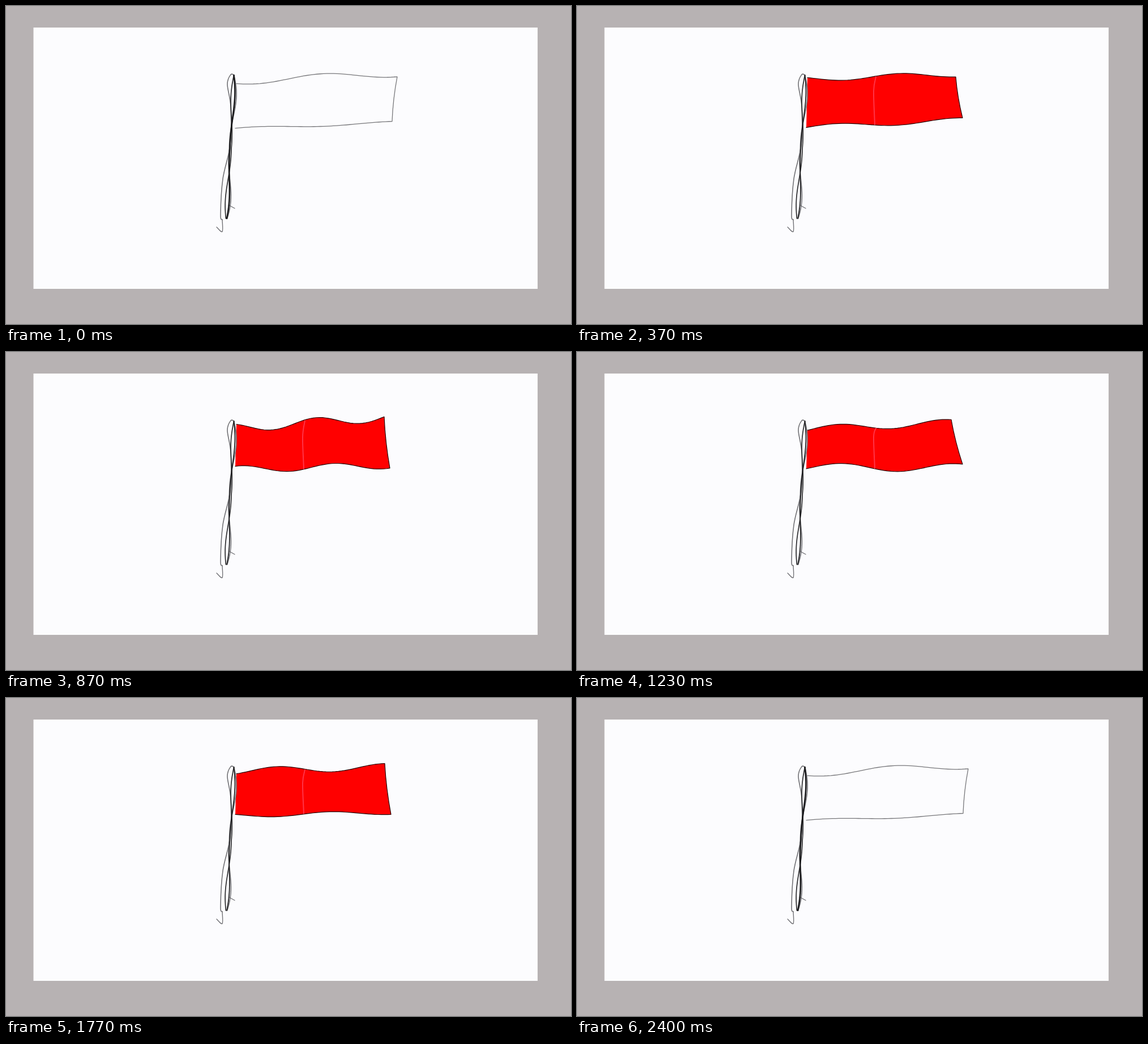
An HTML page with a canvas for the animation above (2.43 s loop, 998x561 px).

```html
<!DOCTYPE html>
<html lang="en">
<head>
<meta charset="utf-8">
<title>Waving flag</title>
<style>
  html, body { margin: 0; width: 100%; height: 100%; overflow: hidden; background: #b7b2b3; }
  canvas { display: block; }
</style>
</head>
<body>
<canvas id="stage" width="998" height="561"></canvas>
<script>
const ctx = document.getElementById('stage').getContext('2d');
const LOOP = 2430, FILL_AT = 100, TEAR_AT = 1900, GONE_AT = 2130, OUTLINE_AT = 2300;

// Each long edge is a straight line carrying a sine wave; its phase, in turns,
// grows with time so that the wave runs from the pole to the free end.
const wave = (from, to, height, phase) => ({ from, to, height, phase });
const key = (time, length, tipTop, tipBottom, top, bottom) =>
  ({ time, length, tipTop, tipBottom, top, bottom });
const keys = [
  key(0, 0.85, 691, 682, wave(133, 119, 6, 0.635), wave(216.5, 205.5, 2, 0.17)),
  key(370, 0.75, 669, 681, wave(128.5, 120.5, 4.5, 0.827), wave(214, 201, 4, 0.264)),
  key(870, 0.6, 668, 678, wave(134, 115, 8, 1.9), wave(207, 200, 6, 1.067)),
  key(1230, 0.72, 661, 681, wave(136, 124.5, 6, 2.306), wave(203.5, 204, 7, 2.306)),
  key(1770, 0.72, 669, 680, wave(129, 121.5, 6, 3.389), wave(207.5, 202, 3.5, 2.847)),
  key(GONE_AT, 0.75, 669, 680, wave(122, 121, 2, 4.4), wave(190, 185, 2, 3.667))
];

const mix = (a, b, p) => a + (b - a) * p;

// Blends two keys field by field, including the nested waves.
function blend(a, b, p) {
  if (typeof a === 'number') return mix(a, b, p);
  return Object.fromEntries(Object.keys(a).map(name => [name, blend(a[name], b[name], p)]));
}

function flagAt(t) {
  const i = Math.max(1, keys.findIndex(k => t < k.time));
  if (t >= GONE_AT) return keys.at(-1);
  const [a, b] = [keys[i - 1], keys[i]];
  return blend(a, b, (t - a.time) / (b.time - a.time));
}

function edgeY({ from, to, height, phase }, length, u) {
  return mix(from, to, u) - height * Math.cos(2 * Math.PI * (u / length - phase));
}

function stroke(color, width) {
  ctx.strokeStyle = color;
  ctx.lineWidth = width;
  ctx.stroke();
}

// Smooth stroke through a few x, y pairs.
function line(coords, color, width) {
  ctx.beginPath();
  ctx.moveTo(coords[0], coords[1]);
  const last = coords.length - 2;
  const at = i => coords.slice(Math.max(0, Math.min(last, i))).slice(0, 2);
  for (let i = 0; i < last; i += 2) {
    const [[ax, ay], [bx, by], [cx, cy], [dx, dy]] = [at(i - 2), at(i), at(i + 2), at(i + 4)];
    ctx.bezierCurveTo(bx + (cx - ax) / 6, by + (cy - ay) / 6,
      cx - (dx - bx) / 6, cy - (dy - by) / 6, cx, cy);
  }
  stroke(color, width);
}

function flagPath({ length, tipTop, tipBottom, top, bottom }) {
  const STEPS = 48;
  ctx.beginPath();
  for (let i = 0; i <= STEPS; i++) {
    const u = i / STEPS;
    ctx.lineTo(mix(407, tipTop, u), edgeY(top, length, u));
  }
  const middle = (edgeY(top, length, 1) + edgeY(bottom, length, 1)) / 2;
  ctx.quadraticCurveTo((tipTop + tipBottom) / 2 - 3, middle, tipBottom, edgeY(bottom, length, 1));
  for (let i = STEPS; i >= 0; i--) {
    const u = i / STEPS;
    ctx.lineTo(mix(405, tipBottom, u), edgeY(bottom, length, u));
  }
}

function drawFlag(t, sketch) {
  const flag = sketch ? keys[0] : flagAt(t);
  const flight = Math.max(0, (t - TEAR_AT) / (GONE_AT - TEAR_AT));
  ctx.save();
  if (!sketch) ctx.translate(376 * flight ** 1.3, 0);
  flagPath(flag);
  if (sketch) {
    stroke('#77777a', 1.3);
  } else {
    ctx.fillStyle = '#f00';
    ctx.fill();
    if (flight) {
      ctx.closePath();
      stroke('#f00', 5);
    } else {
      stroke('#200', 1.2);
      const seamTop = edgeY(flag.top, flag.length, 0.46) + 1;
      const seamBottom = edgeY(flag.bottom, flag.length, 0.44) - 1;
      line([528, seamTop, 524, 150, 526, seamBottom], '#ff3448', 2);
    }
  }
  ctx.restore();
}

// One strand of the pole, winding around a slightly bent axis.
function strand(swing, color, width) {
  ctx.beginPath();
  for (let s = 0; s <= 1; s += 0.02) {
    const reach = swing * (1.5 + 3.5 * Math.abs(2 * s - 1));
    const axis = 402.5 - 13.5 * s ** 1.2;
    ctx.lineTo(axis + reach * Math.sin(3 * Math.PI * s), 122 + 258 * s);
  }
  stroke(color, width);
}

function drawPole(t, sketch) {
  if (t >= TEAR_AT && !sketch) {
    line([415, 130, 414, 150, 411, 175], '#f6cdd4', 3.5);
    line([411, 168, 409, 190, 405, 214], '#b0454c', 3.5);
  }
  const gray = '#707074';
  line([403, 122, 397, 121, 391, 138, 397, 178, 396, 245, 383, 305, 379, 368, 382, 377], gray, 1.6);
  line([382, 377, 382, 398, 372, 390], gray, 1.4);
  line([395, 352, 404, 357], gray, 1.3);
  strand(1.5, gray, 1.6);
  strand(-1, '#2c2c2e', 1.7);
  strand(0.8, '#18181a', sketch ? 2.6 : 1.7);
}

function draw(t) {
  const sketch = t < FILL_AT || t >= OUTLINE_AT;
  ctx.fillStyle = '#b7b2b3';
  ctx.fillRect(0, 0, 998, 561);
  ctx.save();
  ctx.beginPath();
  ctx.rect(48.5, 38, 890.5, 461);
  ctx.clip();
  ctx.fillStyle = '#fcfcfe';
  ctx.fillRect(48, 38, 892, 462);
  ctx.lineJoin = ctx.lineCap = 'round';
  drawFlag(t, sketch);
  drawPole(t, sketch);
  ctx.restore();
}

const start = performance.now();
function tick() {
  draw((performance.now() - start) % LOOP);
  requestAnimationFrame(tick);
}
tick();
</script>
</body>
</html>
```
